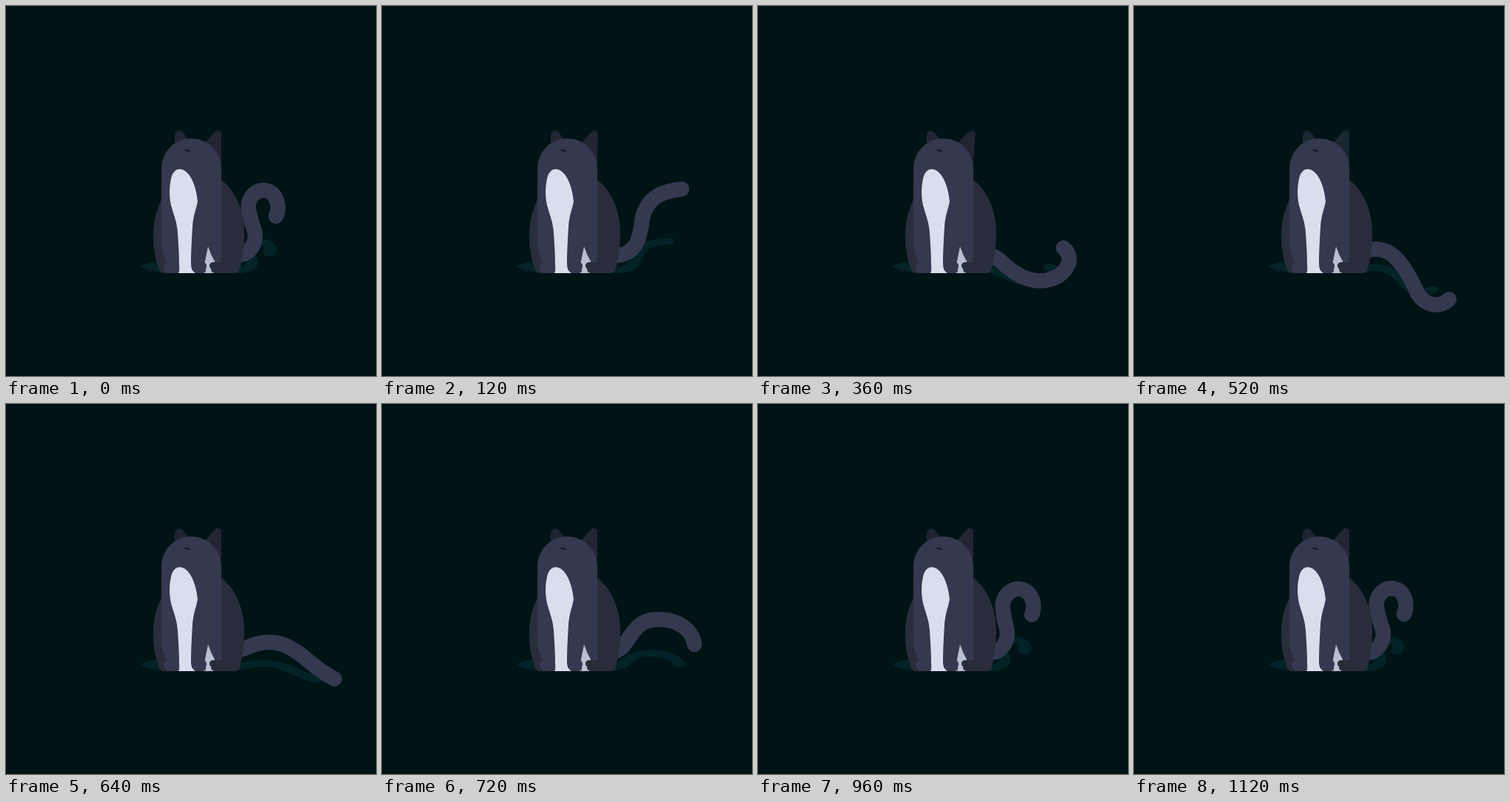
An HTML page for the animation above (1.32 s loop, 500 px wide and 500 px high).

```html
<!DOCTYPE html>
<html lang="en">
<head>
<meta charset="utf-8">
<title>Cat swinging its tail</title>
<style>
  html, body { margin: 0; width: 100%; height: 100%; overflow: hidden; background: #001315; }
  svg { display: block; width: 100vw; height: 100vh; }
  .tail { fill: none; stroke: #34394f; stroke-width: 20.5; stroke-linecap: round; stroke-linejoin: round; }
  .cast { stroke: #032327; }
  .shade { fill: #032327; }
  .ear { fill: #212431; }
  .back { fill: #292d3b; }
  .front { fill: #34394f; }
  .white { fill: #d8deed; }
  .dim { fill: #b9c0d3; }
  .nose { fill: #111b28; }
</style>
</head>
<body>
<svg viewBox="0 0 500 500">
  <path class="shade" d="M182 352C189 346 203 344 218 346V361C203 359 185 357 182 352Z"/>
  <path class="tail cast" transform="matrix(.8 0 0 .436 63.5 210)"/>
  <path class="tail"/>

  <path class="ear" id="earL" d="M228 194V176Q229 168 234 168Q237 168 239 171L249 183Z"/>
  <path class="ear" id="earR" d="M268 186L281 171Q284 167 288 168Q291 169 291 174V212Z"/>

  <path class="back" d="M212 258C202 276 199 294 199 312C199 332 204 349 207 357Q209 361 213 361H309Q314 361 315.500 357C319 344 322 327 322 308C322 278 311 250 290 234Z"/>
  <path class="front" d="M210 219A40.5 40 0 0 1 291 219V346H272V361H232V347H219C213 339 210 330 210 318Z"/>
  <path class="front" d="M221 346C213 346 211 353 215 357Q215 361 219 361H229Q234 361 234 355V340Z"/>

  <path class="white" d="M234 220.500C247 219.500 257 241 259 264C257 275 253 283 252 298C251 315 250 335 250 347C250 354 251 358 256 361H233Q235 358 234 351C234 336 233 322 232 306C231 293 228 286 225 276C219 259 221 240 224 229.500Q228 220.500 234 220.500Z"/>
  <path class="dim" d="M273 325Q277 337 283 347L282 361H265L269 345Z"/>
  <path class="front" d="M262 346H267C271 347 272 352 270 355Q271 361 265 361H260Z"/>
  <path class="back" d="M292 346H281C275 346 273 351 277 355Q277 361 283 361H292Z"/>
  <path class="nose" d="M240.500 194.500Q246 192.500 250 196Q244 198 240.500 194.500Z"/>
</svg>
<script>
const LOOP = 1320, STEP = 40;
const ROOT = [306, 335], DOTS = 60;

const linear = u => u;
const easeIn = u => u ** 1.5;
const easeOut = u => 1 - (1 - u) ** 3;

// The tail is a chain of equal arcs: total length, then the heading in degrees at each joint.
const curled = { len: 166, turn: [20, -52, -110, -100, -30, 58, 115] };
const poses = [
  { at: 0, ...curled },
  { at: 200, ease: easeIn, len: 133, turn: [22, 2, -30, -64, -80, -108, -145] },
  { at: 360, ease: linear, len: 157, turn: [6, 44, 32, 8, -22, -64, -145] },
  { at: 520, ease: linear, len: 159, turn: [-35, 8, 47, 60, 66, 16, -46] },
  { at: 560, ease: linear, len: 159, turn: [-32, 10, 52, 62, 68, 34, -28] },
  { at: 720, ease: linear, len: 150, turn: [6, -56, -52, -10, 12, 40, 82] },
  { at: 1120, ease: easeOut, ...curled }
];

const tails = document.querySelectorAll('.tail');
const earL = document.getElementById('earL');
const earR = document.getElementById('earR');
const mix = (a, b, u) => a + (b - a) * u;
const clamp = u => Math.max(0, Math.min(1, u));

function poseAt(t) {
  const i = poses.findIndex(p => p.at > t);
  if (i < 0) return curled;
  const a = poses[i - 1], b = poses[i];
  const u = b.ease((t - a.at) / (b.at - a.at));
  return { len: mix(a.len, b.len, u), turn: a.turn.map((h, k) => mix(h, b.turn[k], u)) };
}

function tailPath({ len, turn }) {
  let [x, y] = ROOT, d = `M${x} ${y}`;
  for (let i = 0; i < DOTS; i++) {
    const s = (i + 0.5) / DOTS * (turn.length - 1), k = Math.floor(s);
    const heading = mix(turn[k], turn[k + 1], s - k) * Math.PI / 180;
    x += Math.cos(heading) * len / DOTS;
    y += Math.sin(heading) * len / DOTS;
    d += `L${x.toFixed(2)} ${y.toFixed(2)}`;
  }
  return d;
}

function draw(t) {
  const d = tailPath(poseAt(t));
  tails.forEach(el => el.setAttribute('d', d));

  const tilt = 4.5 * clamp(t / 360) * clamp((520 - t) / 120);
  earR.setAttribute('transform', `rotate(${tilt} 284 208)`);
  earL.setAttribute('transform', `rotate(${-tilt / 3} 240 195)`);
  earL.style.fill = earR.style.fill = t >= 480 && t < 560 ? '#1a2731' : '';
}

const start = performance.now();
function tick() {
  const t = (performance.now() - start) % LOOP;
  draw(Math.floor(t / STEP) * STEP);
  requestAnimationFrame(tick);
}
tick();
</script>
</body>
</html>
```
